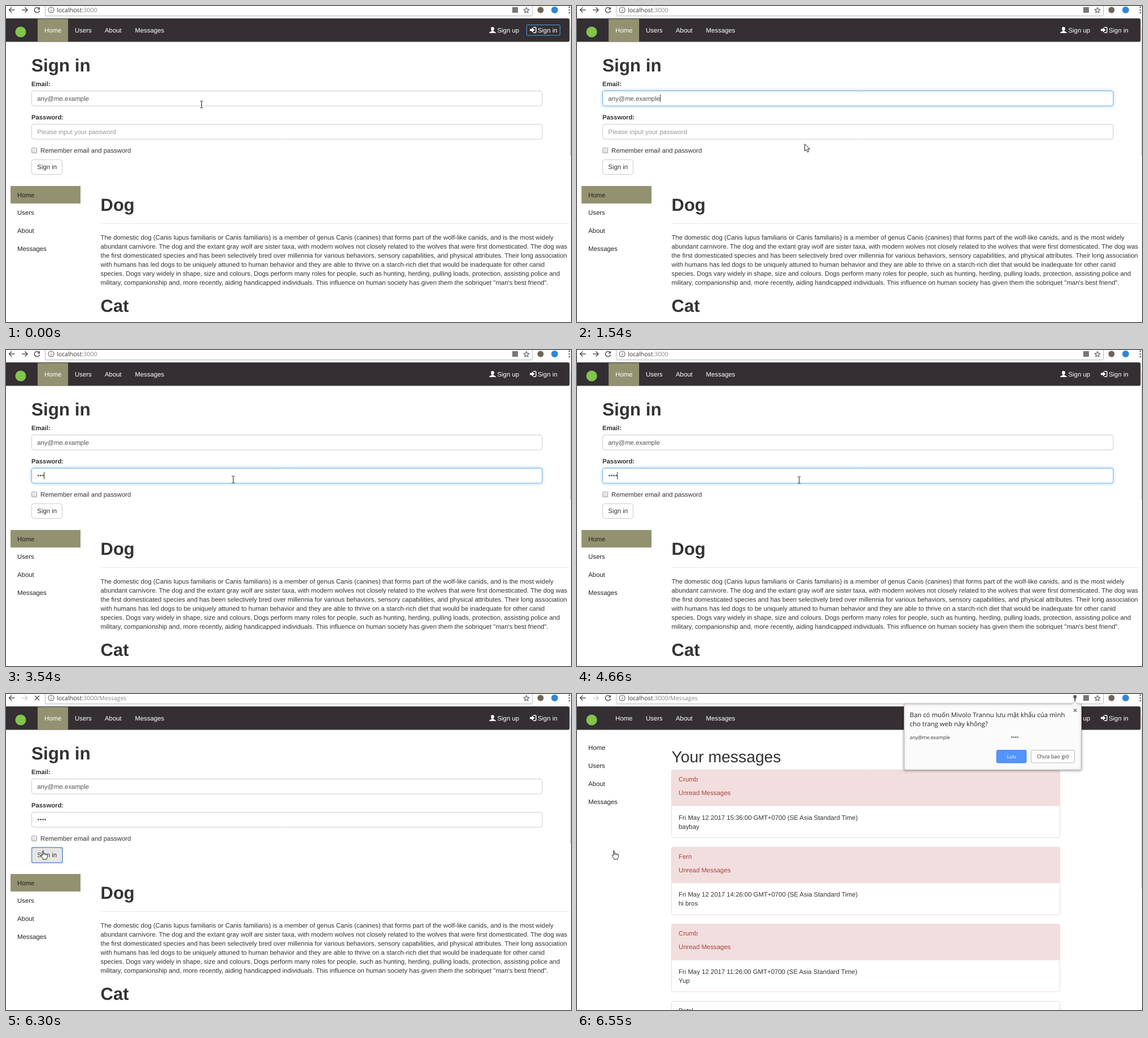
Animation of 1001x560 px, one loop 8000 ms. Source, as an HTML page with a canvas:

```html
<!DOCTYPE html>
<html lang="en">
<head>
<meta charset="utf-8">
<title>Sign in</title>
<style>
  html, body { margin: 0; width: 100%; height: 100%; overflow: hidden; background: #fff; }
  canvas { display: block; }
</style>
</head>
<body>
<canvas id="stage" width="1001" height="560"></canvas>
<script>
const ctx = document.getElementById('stage').getContext('2d');
ctx.textRendering = 'geometricPrecision';

const LOOP = 8000;
const SANS = '"Liberation Sans", Arial, sans-serif';
const UI = '"Open Sans", "Noto Sans", sans-serif';
const BODY = `11.36px ${SANS}`;
const BOLD = `bold 11.3px ${SANS}`;
const DARK = '#342f33', OLIVE = '#939270', INK = '#333';
const EMAIL = 'any@me.example';
const MENU = ['Home', 'Users', 'About', 'Messages'];

const ARTICLE = [
  'The domestic dog (Canis lupus familiaris or Canis familiaris) is a member of genus Canis (canines) that forms part of the wolf-like canids, and is the most widely',
  'abundant carnivore. The dog and the extant gray wolf are sister taxa, with modern wolves not closely related to the wolves that were first domesticated. The dog was',
  'the first domesticated species and has been selectively bred over millennia for various behaviors, sensory capabilities, and physical attributes. Their long association',
  'with humans has led dogs to be uniquely attuned to human behavior and they are able to thrive on a starch-rich diet that would be inadequate for other canid',
  'species. Dogs vary widely in shape, size and colours. Dogs perform many roles for people, such as hunting, herding, pulling loads, protection, assisting police and',
  'military, companionship and, more recently, aiding handicapped individuals. This influence on human society has given them the sobriquet "man\'s best friend".'
];

const MESSAGES = [
  ['Crumb', '15:36', 'baybay'],
  ['Fern', '14:26', 'hi bros'],
  ['Crumb', '11:26', 'Yup']
];

// time, cursor shape, x, top y
const MOVES = [
  [0, 'beam', 346, 168], [180, 'beam', 346, 164],
  [640, 'beam', 349, 169], [730, 'arrow', 358, 228], [810, 'arrow', 367, 270],
  [1000, 'arrow', 378, 318], [1090, 'arrow', 394, 396], [1180, 'arrow', 408, 474],
  [1270, 'arrow', 415, 515], [1360, 'arrow', 413, 446], [1450, 'arrow', 408, 335],
  [1540, 'arrow', 403, 244], [1630, 'beam', 402, 224], [1720, 'beam', 401, 223],
  [1800, 'beam', 400, 222], [2260, 'beam', 402, 223],
  [4660, 'beam', 393, 224], [4750, 'arrow', 322, 248], [4840, 'arrow', 205, 263],
  [4930, 'arrow', 135, 269], [5490, 'arrow', 100, 268], [5580, 'arrow', 74, 268],
  [5670, 'hand', 70, 273], [5760, 'hand', 68, 276], [5850, 'hand', 67, 277]
];
const KEYS = [3090, 3260, 3540, 4200];
const EMAIL_CARET = [[360, 730], [1260, 1800]];
const PASSWORD_CARET = [[1890, 2440], [2990, 4110], [4200, 4750], [5210, 5760]];

const within = (t, spans) => spans.some(([from, to]) => t >= from && t < to);

function text(str, x, y, color = INK, font = BODY, align = 'left') {
  ctx.font = font;
  ctx.fillStyle = color;
  ctx.textAlign = align;
  ctx.fillText(str, x, y);
}

function rect(x, y, w, h, color) {
  ctx.fillStyle = color;
  ctx.fillRect(x, y, w, h);
}

function box(x, y, w, h, radius, fill, stroke) {
  ctx.beginPath();
  ctx.roundRect(x, y, w, h, radius);
  if (fill) { ctx.fillStyle = fill; ctx.fill(); }
  if (stroke) { ctx.strokeStyle = stroke; ctx.lineWidth = 1; ctx.stroke(); }
}

function disc(x, y, r, color) {
  ctx.beginPath();
  ctx.arc(x, y, r, 0, Math.PI * 2);
  ctx.fillStyle = color;
  ctx.fill();
}

function path(d, x, y, fill, stroke, width = 1) {
  const shape = new Path2D(d);
  ctx.save();
  ctx.translate(x, y);
  ctx.lineJoin = 'round';
  if (fill) { ctx.fillStyle = fill; ctx.fill(shape); }
  if (stroke) { ctx.strokeStyle = stroke; ctx.lineWidth = width; ctx.stroke(shape); }
  ctx.restore();
}

function browserBar(t) {
  const moved = t >= 6210, loading = moved && t < 6380;
  rect(0, 0, 1001, 22, '#fff');
  box(69.5, -6, 863, 23.5, 2, '#fff', '#b8b8b8');
  path('M5 -4.5 L0.5 0 L5 4.5 M0.5 0 H10.5', 5, 7, null, '#555', 1.6);
  path('M5.5 -4.5 L10 0 L5.5 4.5 M10 0 H0', 28, 7, null, moved ? '#d0d0d0' : '#555', 1.6);
  if (loading) {
    path('M-4 -4 L4 4 M4 -4 L-4 4', 55, 7, null, '#555', 1.6);
  } else {
    path('M3.4 -3 A4.6 4.6 0 1 0 4.5 1', 55, 7, null, '#555', 1.5);
    path('M5 -5.5 V-0.8 H0.4 Z', 55, 7, '#555');
  }
  path('M5 0 A5 5 0 1 1 -5 0 A5 5 0 1 1 5 0 M0 -0.8 V3 M0 -3 V-1.9', 80, 7, null, '#666', 1.1);
  const urlFont = `10.6px ${UI}`;
  text('localhost', 90, 11, '#333', urlFont);
  const hostWidth = ctx.measureText('localhost').width;
  text(moved ? ':3000/Messages' : ':3000', 90 + hostWidth, 11, '#858585', urlFont);
  if (t >= 6380) {
    box(879.5, 2, 5.5, 5.5, 1.5, '#555');
    rect(881.2, 7, 2.2, 5.5, '#555');
  }
  if (!loading) rect(897, 2, 10, 10, '#777');
  path('M0 -5 L1.4 -1.6 L5 -1.4 L2.2 0.9 L3.1 4.4 L0 2.5 L-3.1 4.4 L-2.2 0.9 L-5 -1.4 L-1.4 -1.6 Z',
    922, 7.5, null, '#555', 1.1);
  disc(947, 7, 5.5, '#6b6656');
  disc(972, 7, 6, '#2f86d6');
  for (const y of [2, 7, 12]) disc(998, y, 1.3, '#555');
}

function navbar(t) {
  box(-4, 22, 1002.5, 41.5, 3, DARK);
  disc(26, 46, 9.5, '#83c44d');
  if (t < 6380) rect(56, 23, 54, 40, OLIVE);
  [68, 122, 175, 228.5].forEach((x, i) => text(MENU[i], x, 47, '#fff'));
  path('M6 0 C8 0 9 1.5 8.8 3.4 C8.6 5 8 6 7.5 6.6 V7.6 C9 8.4 12 9 12 11 H0 C0 9 3 8.4 4.5 7.6 V6.6 C4 6 3.4 5 3.2 3.4 C3 1.5 4 0 6 0 Z',
    856, 37, '#fff');
  text('Sign up', 870.5, 47, '#fff');
  path('M0 3.7 H3.8 V1 L8.5 5.5 L3.8 10 V7.3 H0 Z', 928, 37, '#fff');
  path('M6 0.8 H9.5 Q11 0.8 11 2.3 V8.7 Q11 10.2 9.5 10.2 H6', 928, 37, null, '#fff', 1.5);
  text('Sign in', 942, 47, '#fff');
  if (t < 360) box(922.5, 33.5, 59, 18.5, 1, null, '#5b9bdc');
}

function sidebar(top, active) {
  if (active) rect(8, Math.round(top), 124, 31, OLIVE);
  MENU.forEach((label, i) => text(label, 20, top + 20 + i * 31.8, '#222'));
}

function field(y, focus) {
  if (focus) {
    ctx.save();
    ctx.shadowColor = `rgba(102,175,233,${0.6 * focus})`;
    ctx.shadowBlur = 6;
    box(45, y - 0.5, 905, 27.5, 3.5, '#fff');
    ctx.restore();
  }
  box(45.5, y, 904.5, 26.5, 3.5, '#fff', focus ? (focus < 1 ? '#99bddb' : '#66afe9') : '#ccc');
}

function caret(x, y) {
  rect(Math.round(x), y, 1, 13, '#333');
}

function signInPage(t) {
  text('Sign in', 45, 116, INK, `bold 31.4px ${SANS}`);
  text('Email:', 45, 142, INK, BOLD);
  field(150.5, t < 360 || t >= 1890 ? 0 : t < 450 ? 0.5 : 1);
  text(EMAIL, 55.3, 167.5, '#555');
  if (within(t, EMAIL_CARET)) caret(55.3 + ctx.measureText(EMAIL).width, 157);

  text('Password:', 45, 201, INK, BOLD);
  field(209.5, t < 1890 || t >= 6120 ? 0 : t < 1980 ? 0.5 : 1);
  const typed = KEYS.filter(k => t >= k).length;
  if (!typed) text('Please input your password', 55.3, 226.5, '#999');
  for (let i = 0; i < typed; i++) disc(57.5 + i * 4, 222.5, 1.4, '#555');
  if (within(t, PASSWORD_CARET)) caret(55 + typed * 4, 216);

  const shade = ctx.createLinearGradient(0, 251, 0, 261);
  shade.addColorStop(0, '#f4f4f4');
  shade.addColorStop(1, '#d9d9d9');
  box(45.5, 251.5, 9, 9, 1.5, shade, '#a5a5a5');
  text('Remember email and password', 61, 260);

  const hover = t >= 5490, pressed = t >= 6120;
  box(45.5, 272.5, 54, 26, 3.5, hover ? '#e6e6e6' : '#fff', hover ? '#adadad' : '#ccc');
  if (pressed) {
    ctx.lineWidth = 2;
    ctx.strokeStyle = '#7fa9e0';
    ctx.beginPath();
    ctx.roundRect(45.5, 272, 54.5, 27, 2);
    ctx.stroke();
  }
  text('Sign in', 55.3, 289.3);

  sidebar(318.5, true);
  text('Dog', 167.5, 363, INK, `bold 31px ${SANS}`);
  rect(168, 385, 830, 1, '#e8e8e8');
  ARTICLE.forEach((line, i) => text(line, 167.5, 414 + i * 15.95));
  text('Cat', 167.5, 542, INK, `bold 31px ${SANS}`);
  rect(1000, 37, 1, 228, '#c4c4c4');
}

function messagesPage() {
  sidebar(79.3, false);
  text('Your messages', 167.5, 121, INK, `28.3px ${SANS}`);
  MESSAGES.forEach(([name, time, body], i) => {
    const y = 134.5 + i * 136.6;
    box(167.5, y, 688, 120, 3, '#fff');
    box(167.5, y, 688, 64, [3, 3, 0, 0], '#f2dede');
    box(167.5, y, 688, 120, 3, null, '#ecdadc');
    text(name, 180, y + 20.5, '#a94442');
    text('Unread Messages', 180, y + 44.5, '#a94442');
    text(`Fri May 12 2017 ${time}:00 GMT+0700 (SE Asia Standard Time)`, 180, y + 88);
    text(body, 180, y + 104);
  });
  box(167.5, 544.5, 688, 120, 3, '#fdfdfd', '#ddd');
  text('Petal', 180, 565);
  rect(1000, 37, 1, 308, '#c4c4c4');
}

function savePrompt(alpha) {
  ctx.save();
  ctx.globalAlpha = alpha;
  ctx.shadowColor = 'rgba(0,0,0,.35)';
  ctx.shadowBlur = 4;
  ctx.shadowOffsetY = 1;
  box(579.5, 17.5, 314, 117, 2, '#fbfbfb', '#b5b5b5');
  ctx.shadowColor = 'transparent';
  path('M-5 5.5 L0 0 L5 5.5', 882, 13, '#fbfbfb', '#b5b5b5');
  rect(877.5, 18, 9, 2, '#fbfbfb');
  const title = `11.4px ${UI}`, small = `9.2px ${UI}`;
  text('Bạn có muốn Mivolo Trannu lưu mật khẩu của mình', 589.5, 41, '#222', title);
  text('cho trang web này không?', 589.5, 57, '#222', title);
  path('M-2.7 -2.7 L2.7 2.7 M2.7 -2.7 L-2.7 2.7', 882.5, 29, null, '#666', 1.3);
  text(EMAIL, 589.5, 79.5, '#333', `8.6px ${UI}`);
  text('****', 768.5, 81, '#333', `9px ${SANS}`);
  box(743.5, 99.5, 52.5, 22.5, 2, '#5394fc', '#3f7fe6');
  text('Lưu', 770, 114, '#fff', small, 'center');
  box(804.5, 99.5, 77, 22.5, 2, '#fdfdfd', '#b8b8b8');
  text('Chưa bao giờ', 843, 114, '#333', small, 'center');
  ctx.restore();
}

function cursor(t) {
  const [, shape, x, y] = MOVES.findLast(m => t >= m[0]);
  if (shape === 'beam') {
    path('M-2 0.5 H0 M1 0.5 H3 M0.5 1 V12 M-2 12.5 H0 M1 12.5 H3', x, y, null, '#222');
  } else if (shape === 'arrow') {
    path('M0.5 0.5 V13 L3.4 10.3 L5.4 15 L7.6 14 L5.6 9.5 H9.5 Z', x, y, '#fff', '#222');
  } else {
    path('M-2.5 9 V1 Q-1.5 -0.8 -0.5 1 V6 Q1 4.6 2 6.3 Q3.3 5.2 4.3 7 Q6.2 6 6.5 8.3 V11.5 Q6 13.5 5 14.5 V16 H-1.5 V14.5 L-5 9.7 Q-5 7.5 -2.5 9 Z',
      x, y, '#fff', '#222');
    path('M2 6.5 V9 M4.3 7 V9 M-0.5 6 V8.5', x, y, null, '#222', 0.8);
  }
}

function draw(t) {
  rect(0, 0, 1001, 560, '#fff');
  browserBar(t);
  navbar(t);
  if (t < 6380) signInPage(t);
  else messagesPage();
  if (t >= 6470) savePrompt(t < 6550 ? 0.5 : 1);
  cursor(t);
}

const start = performance.now();
function tick() {
  draw((performance.now() - start) % LOOP);
  requestAnimationFrame(tick);
}
tick();
</script>
</body>
</html>
```
